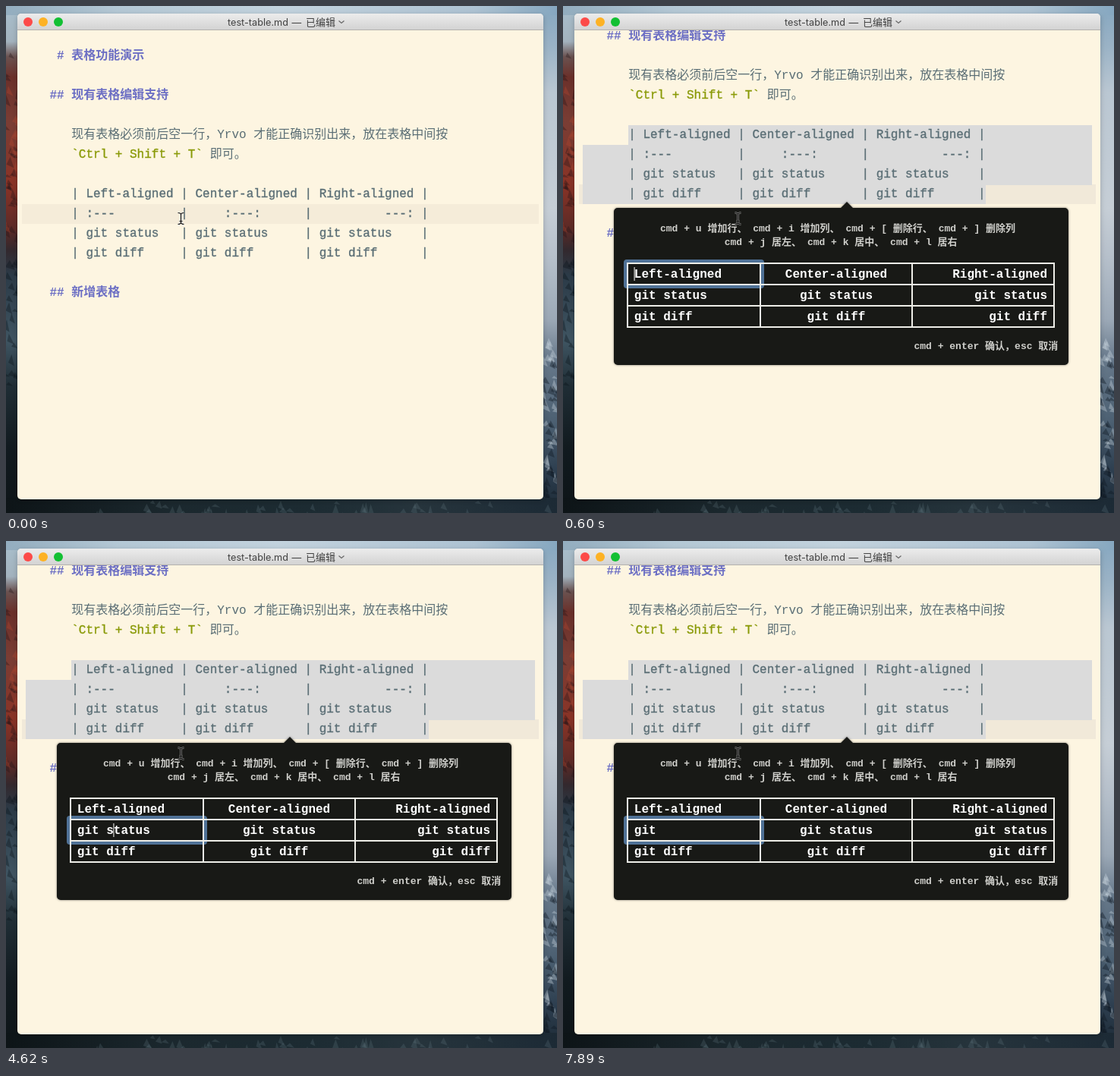
An HTML page with a canvas that plays this animation: 726 px wide and 668 px high, repeating every 8 s.

```html
<!DOCTYPE html>
<html lang="zh-CN">
<head>
<meta charset="utf-8">
<title>test-table.md</title>
<style>
  html, body { margin: 0; width: 100%; height: 100%; overflow: hidden; background: #16222a; }
  canvas { display: block; }
</style>
</head>
<body>
<canvas id="stage" width="726" height="668"></canvas>
<script>
const W = 726, H = 668, LOOP = 8000;
const ctx = document.getElementById('stage').getContext('2d');
const MONO = '"Liberation Mono", "Noto Sans CJK SC", "Noto Sans CJK", monospace';
const SANS = 'Inter, "Noto Sans CJK SC", "Noto Sans CJK", sans-serif';
const PAPER = '#fdf5e1', INK = '#5a6e75', HEAD = '#6c6fc4', GREEN = '#8a9a08', PANEL = '#181916';

const CH = 9.602, LEFT = 86.2, LINE = 26;
const TABLE = [
  '| Left-aligned | Center-aligned | Right-aligned |',
  '| :---         |     :---:      |          ---: |',
  '| git status   | git status     | git status    |',
  '| git diff     | git diff       | git diff      |'
];
const CELLS = [
  ['Left-aligned', 'Center-aligned', 'Right-aligned'],
  ['git status', 'git status', 'git status'],
  ['git diff', 'git diff', 'git diff']
];
const COLS = [85, 260, 460, 647], ROWS = [417, 445, 473, 501];

// time, row, column, caret offset in characters, caret visible
const STEPS = [
  [300, 0, 0, 0, 1], [900, 0, 0, 0, 0], [1340, 0, 0, 0, 1],
  [1640, 0, 1, 0, 1], [1930, 0, 2, 0, 1],
  [2080, 1, 0, 0, 1], [2680, 1, 0, 0, 0], [3130, 1, 0, 0, 1],
  [3280, 1, 0, 1, 1], [3420, 1, 0, 2, 1], [3720, 1, 0, 3, 1],
  [4170, 1, 0, 4, 1], [4620, 1, 0, 5, 1], [4760, 1, 0, 6, 1],
  [5060, 1, 0, 8, 1], [5360, 1, 0, 9, 1], [5510, 1, 0, 10, 1],
  [5800, 1, 0, 4, 1], [6100, 1, 0, 4, 0], [7300, 1, 0, 4, 1], [7890, 1, 0, 4, 0]
];
const ERASED = 5800;

function text(c, str, x, y, font, color) {
  c.font = font;
  c.fillStyle = color;
  c.fillText(str, x, y);
}

// regular text with a slightly heavier stem
function code(str, x, y, color) {
  text(ctx, str, x, y, '16px ' + MONO, color);
  ctx.strokeStyle = color;
  ctx.lineWidth = 0.35;
  ctx.strokeText(str, x, y);
}

function rect(c, x1, y1, x2, y2, color) {
  c.fillStyle = color;
  c.fillRect(x1, y1, x2 - x1, y2 - y1);
}

function box(c, x1, y1, x2, y2, r, color) {
  c.fillStyle = color;
  c.beginPath();
  c.roundRect(x1, y1, x2 - x1, y2 - y1, r);
  c.fill();
}

function ramp(c, x1, y1, x2, y2, stops) {
  const g = c.createLinearGradient(x1, y1, x2, y2);
  stops.forEach(([p, color]) => g.addColorStop(p, color));
  return g;
}

function random(seed) {
  return () => (seed = seed * 16807 % 2147483647) / 2147483647;
}

function rocks(c, n, x1, y1, x2, y2, color, seed) {
  const rnd = random(seed);
  c.fillStyle = color;
  for (let i = 0; i < n; i++) {
    const x = x1 + rnd() * (x2 - x1), y = y1 + rnd() * (y2 - y1), h = 4 + rnd() * 14;
    c.beginPath();
    c.moveTo(x, y);
    c.lineTo(x + 3 + rnd() * 4, y + h);
    c.lineTo(x - 2 - rnd() * 4, y + h * 0.7);
    c.fill();
  }
}

function paintDesktop(c) {
  rect(c, 0, 0, 360, H, ramp(c, 0, 0, 0, H, [
    [0, '#a9bfcd'], [0.07, '#a3b3be'], [0.1, '#6a5250'], [0.14, '#6b302a'],
    [0.23, '#7a3d34'], [0.35, '#8a3326'], [0.44, '#5c2a26'], [0.48, '#33282d'],
    [0.53, '#2b3a47'], [0.66, '#3f5562'], [0.75, '#1f2d35'], [0.87, '#111a1f'], [1, '#0d1417']]));
  rect(c, 360, 0, W, H, ramp(c, 0, 0, 0, H, [
    [0, '#86a7c0'], [0.08, '#9bb3c6'], [0.17, '#bac7d2'], [0.4, '#c6ced6'],
    [0.5, '#b5bfca'], [0.62, '#9ba8b6'], [0.7, '#66788a'], [0.82, '#4c6072'],
    [0.92, '#2c3d4e'], [1, '#1c2a35']]));
  rocks(c, 26, 0, 60, 15, 300, 'rgba(35,20,24,.35)', 17);
  rocks(c, 10, 0, 90, 15, 290, 'rgba(180,72,48,.35)', 91);
  rocks(c, 20, 0, 310, 15, 500, 'rgba(10,18,24,.35)', 45);
  rocks(c, 24, 708, 430, W, 640, 'rgba(210,220,230,.35)', 33);
  rocks(c, 28, 708, 440, W, 660, 'rgba(14,24,36,.4)', 71);
  rect(c, 0, 0, W, 12, ramp(c, 0, 0, W, 0, [
    [0, '#93adbf'], [0.2, '#b4c8d5'], [0.5, '#c3d3de'], [0.85, '#aec3d3'], [1, '#86a7c0']]));
  rect(c, 0, 648, W, H, ramp(c, 0, 0, W, 0, [
    [0, '#0d1417'], [0.3, '#1b282e'], [0.55, '#1c2b32'], [0.75, '#26343c'], [1, '#1c2a35']]));
  rocks(c, 50, 120, 650, W, H, 'rgba(110,130,142,.22)', 29);

  c.shadowColor = 'rgba(0,0,0,.22)';
  c.shadowBlur = 7;
  c.shadowOffsetY = 2;
  box(c, 15, 10, 708, 650, 5, PAPER);
  c.shadowColor = 'transparent';

  box(c, 15, 10, 708, 32, [5, 5, 0, 0], ramp(c, 0, 10, 0, 32, [[0, '#ececec'], [1, '#d2d2d2']]));
  rect(c, 15, 31, 708, 32, '#b4b2ae');
  ['#fc4b49', '#fdb225', '#12c033'].forEach((color, i) => {
    c.fillStyle = color;
    c.beginPath();
    c.arc(29 + i * 20, 21, 6, 0, 7);
    c.fill();
  });
  const title = '12.7px ' + SANS;
  text(c, 'test-table.md', 292, 26, title, '#424242');
  text(c, '—', 376.5, 26, title, '#424242');
  text(c, '已编辑', 395, 26, '13px ' + SANS, '#424242');
  c.strokeStyle = '#666';
  c.lineWidth = 1.2;
  c.beginPath();
  c.moveTo(438.5, 19.5);
  c.lineTo(442, 22.5);
  c.lineTo(445.5, 19.5);
  c.stroke();
}

function heading(mark, label, row) {
  const y = 70 + row * LINE, font = 'bold 16px ' + MONO;
  text(ctx, mark, LEFT - (mark.length + 1) * CH, y, font, HEAD);
  text(ctx, label, LEFT, y, font, HEAD);
}

function drawDocument(open, settled) {
  const font = '16px ' + MONO;
  if (open) {
    rect(ctx, 21, 313, 702, 339, settled ? '#f1e9d9' : '#f7eeda');
    rect(ctx, 86, 235, 697, 261, '#dbdbdb');
    rect(ctx, 26, 261, 697, 314, '#dbdbdb');
    rect(ctx, 26, 313, 557, 339, '#dbdbdb');
  } else {
    rect(ctx, 21, 261, 702, 287, '#f5ecd9');
  }
  heading('#', '表格功能演示', 0);
  heading('##', '现有表格编辑支持', 2);
  text(ctx, '现有表格必须前后空一行，Yrvo 才能正确识别出来，放在表格中间按', LEFT, 174, font, INK);
  code('`Ctrl + Shift + T`', LEFT, 200, GREEN);
  text(ctx, '即可。', LEFT + 19 * CH, 200, font, INK);
  TABLE.forEach((line, i) => code(line, LEFT, 252 + i * LINE, INK));
  heading('##', '新增表格', 12);
}

function cellX(str, col) {
  const w = str.length * CH;
  return col === 0 ? 93.8 : col === 1 ? 360 - w / 2 : 638 - w;
}

function drawPanel(t, step) {
  const [, row, col, offset, on] = step;
  ctx.save();
  ctx.shadowColor = 'rgba(0,0,0,.5)';
  ctx.shadowBlur = 3;
  ctx.fillStyle = PANEL;
  ctx.beginPath();
  ctx.roundRect(67, 344, 599, 207, 5);
  ctx.moveTo(365.5, 344.5);
  ctx.lineTo(374, 336);
  ctx.lineTo(382.5, 344.5);
  ctx.fill();
  ctx.restore();

  if (t < 450) text(ctx, '# 新增表格', LEFT - 2 * CH, 382, 'bold 16px ' + MONO, '#0b0b1e');

  const hint = 'bold 13px ' + MONO, grey = '#cfcfcb';
  text(ctx, 'cmd + u 增加行、 cmd + i 增加列、 cmd + [ 删除行、 cmd + ] 删除列', 128, 375, hint, grey);
  text(ctx, 'cmd + j 居左、 cmd + k 居中、 cmd + l 居右', 212.7, 393, hint, grey);
  text(ctx, 'cmd + enter 确认，esc 取消', 462.5, 530, hint, grey);

  const x1 = COLS[col], x2 = COLS[col + 1], y1 = ROWS[row], y2 = ROWS[row + 1];
  box(ctx, x1 - 5, y1 - 5, x2 + 5, y2 + 5, 4, '#507297');
  rect(ctx, x1, y1, x2, y2, PANEL);

  COLS.forEach(x => rect(ctx, x - 1, 416, x + 1, 502, '#eeeee8'));
  ROWS.forEach(y => rect(ctx, 84, y - 1, 648, y + 1, '#eeeee8'));

  CELLS.forEach((cells, r) => cells.forEach((str, c) => {
    const erased = t >= ERASED && r === 1 && c === 0;
    text(ctx, erased ? 'git ' : str, cellX(str, c), 436 + r * 28, 'bold 16px ' + MONO, '#fff');
  }));

  if (on) {
    const x = cellX(CELLS[row][col], col) + 0.3 + offset * 9.56;
    rect(ctx, x - 0.6, 422 + row * 28, x + 0.6, 440 + row * 28, '#d8d8d4');
  }
}

function drawPointer() {
  ctx.beginPath();
  ctx.moveTo(226.5, 272.5);
  ctx.quadraticCurveTo(230.5, 272.5, 230.5, 275);
  ctx.quadraticCurveTo(230.5, 272.5, 234.5, 272.5);
  ctx.moveTo(230.5, 275);
  ctx.lineTo(230.5, 285);
  ctx.quadraticCurveTo(230.5, 287.5, 226.5, 287.5);
  ctx.moveTo(230.5, 285);
  ctx.quadraticCurveTo(230.5, 287.5, 234.5, 287.5);
  ctx.moveTo(228.5, 283.5);
  ctx.lineTo(232.5, 283.5);
  ctx.strokeStyle = 'rgba(255,255,255,.5)';
  ctx.lineWidth = 2.6;
  ctx.stroke();
  ctx.strokeStyle = '#111';
  ctx.lineWidth = 1.2;
  ctx.stroke();
}

const desktop = document.createElement('canvas');
desktop.width = W;
desktop.height = H;
paintDesktop(desktop.getContext('2d'));

function draw(t) {
  const step = STEPS.filter(s => s[0] <= t).pop();
  const scroll = t < 450 ? 0 : t < 600 ? 74 : 78;
  ctx.drawImage(desktop, 0, 0);
  ctx.save();
  ctx.beginPath();
  ctx.rect(15, 32, 693, 617);
  ctx.clip();
  ctx.translate(0, -scroll);
  drawDocument(!!step, t >= 600);
  if (step) drawPanel(t, step);
  ctx.restore();
  drawPointer();
}

const start = performance.now();
function tick() {
  draw((performance.now() - start) % LOOP);
  requestAnimationFrame(tick);
}
tick();
</script>
</body>
</html>
```
